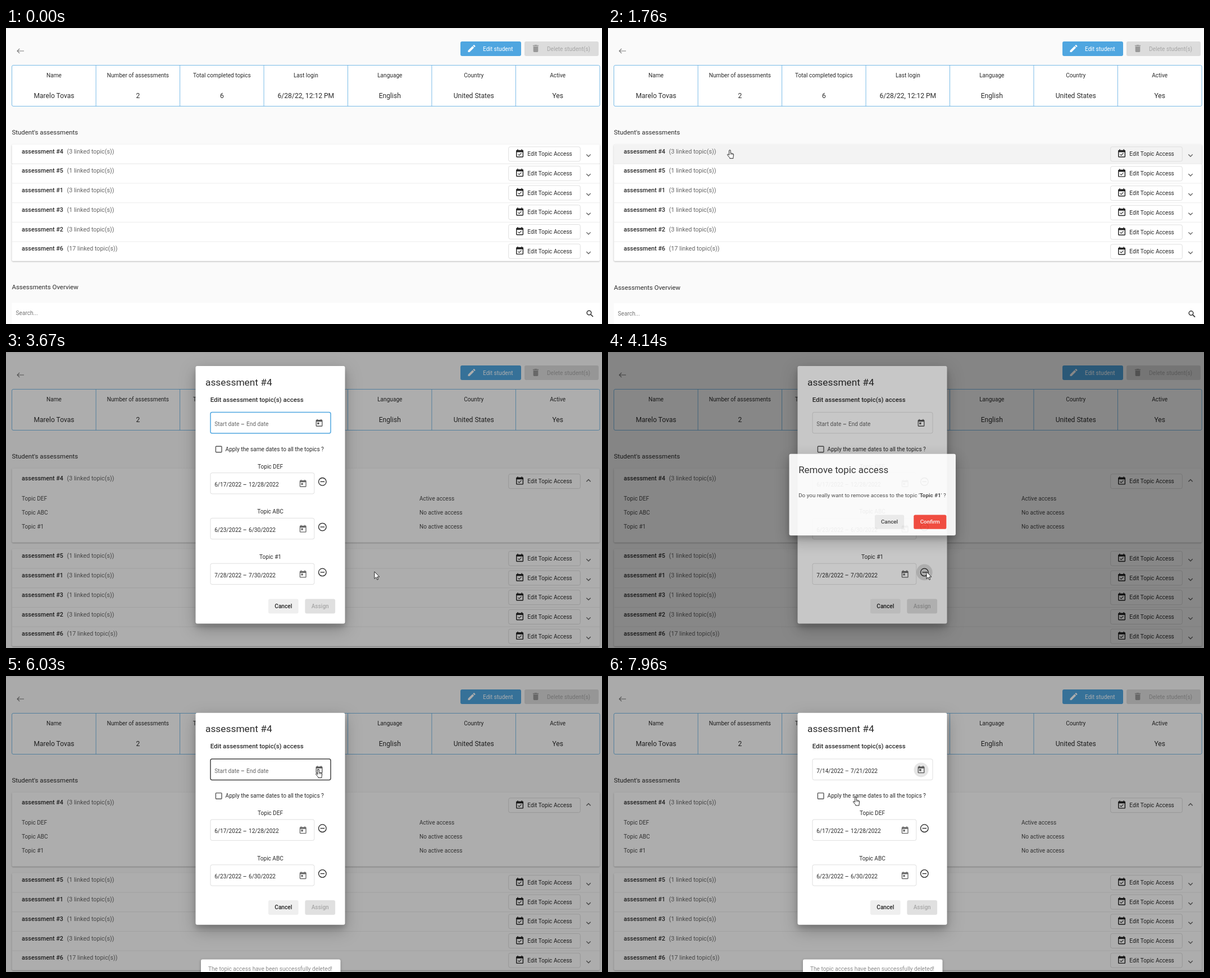
Write an HTML page that moves like this. It is 1061 px wide and 528 px high and loops after 8000 ms.

```html
<!DOCTYPE html>
<html lang="en">
<head>
<meta charset="utf-8">
<title>Student assessments</title>
<style>
html, body { margin: 0; width: 100%; height: 100%; overflow: hidden; background: #fafafa; }
svg { display: block; width: 100vw; height: 100vh; font: 10.1px Roboto, sans-serif; fill: #2b2b2b; }
.m { font-weight: 500; }
.b { font-weight: 700; }
.card { fill: #fff; filter: drop-shadow(0 1px 1px rgba(0,0,0,.28)); }
.modal { fill: #fff; filter: drop-shadow(0 6px 5px rgba(0,0,0,.16)) drop-shadow(0 9px 14px rgba(0,0,0,.26)); }
.pop { fill: #fff; filter: drop-shadow(0 1px 2px rgba(0,0,0,.3)); }
</style>
</head>
<body>
<svg id="stage" viewBox="0 0 1061 528" xmlns="http://www.w3.org/2000/svg"></svg>
<script>
const LOOP = 8000, BLUE = '#4fa6e0', STEP = 34.72, TOPIC = 80.8;
const stage = document.getElementById('stage');

// ---- markup helpers
const text = (x, y, s, o = '') => `<text x="${x}" y="${y}" ${o}>${s}</text>`;
const mid = (x, y, s, o = '') => text(x, y, s, 'text-anchor="middle" ' + o);
const rect = (x, y, w, h, o = '') => `<rect x="${x}" y="${y}" width="${w}" height="${h}" ${o}/>`;
const group = (id, s, o = '') => `<g id="${id}" ${o}>${s}</g>`;
const line = (d, o) => `<path d="${d}" fill="none" ${o}/>`;
const icon = (cx, cy, d, fill, k = .7225) =>
  `<path transform="translate(${cx} ${cy}) scale(${k}) translate(-12 -12)" d="${d}" fill="${fill}" fill-rule="evenodd"/>`;

const CAL = 'M19 3h-1V1h-2v2H8V1H6v2H5q-2 0-2 2v14q0 2 2 2h14q2 0 2-2V5q0-2-2-2zm0 16H5V8h14z';
const CAL_DAY = CAL + 'M7 10h5v5H7z';
const CAL_CHECK = CAL + 'M16.5 11l-1-1-4.9 4.9-2.1-2.1-1.1 1 3.2 3.2z';
const PENCIL = 'M3 17.2V21h3.8L17.8 9.9l-3.7-3.7zM20.7 7q.7-.7 0-1.4l-2.3-2.3q-.7-.7-1.4 0l-1.9 1.8 3.8 3.8z';
const TRASH = 'M6 19q0 2 2 2h8q2 0 2-2V7H6zM19 4h-3.5l-1-1h-5l-1 1H5v2h14z';

// ---- page
const columns = [
  ['Name', 'Marelo Tovas'], ['Number of assessments', '2'], ['Total completed topics', '6'],
  ['Last login', '6/28/22, 12:12 PM'], ['Language', 'English'], ['Country', 'United States'], ['Active', 'Yes']
];
const rows = [[4, 3], [5, 1], [1, 3], [3, 1], [2, 3], [6, 17]];

function header() {
  const border = `stroke="${BLUE}" stroke-width=".75"`;
  let s = rect(0, 0, 1061, 528, 'fill="#fafafa"') + rect(0, 0, 1061, 1.6, 'fill="#efefef"');
  s += line('M32 41H20M24.2 36.8L20 41l4.2 4.2', 'stroke="#7a7a7a" stroke-width="1.2"');
  s += rect(809, 24, 108, 26, `rx="3" fill="${BLUE}"`) + icon(829, 36.5, PENCIL, '#fff') +
    text(849, 40.6, 'Edit student', 'fill="#fff"');
  s += rect(923, 24, 132, 26, 'rx="3" fill="#dcdcdc"') + icon(943, 36.5, TRASH, '#999') +
    text(963, 40.6, 'Delete student(s)', 'fill="#a6a6a6"');
  s += rect(10.5, 66.5, 1046.5, 73, `rx="2.5" fill="#fff" ${border}`);
  columns.forEach(([name, value], i) => {
    const x = 10.7 + 149.45 * i;
    if (i) s += line(`M${x} 66.5v73`, border);
    s += mid(x + 74.8, 88, name) + mid(x + 74.8, 124.8, value, 'font-size="12.1"');
  });
  return s + text(10.5, 189.5, 'Student\'s assessments', 'font-size="11.45"');
}

const row = ([id, count], i) => group('row' + i,
  rect(10.5, 207.5, 1046.5, STEP, `id="hover${i}" fill="#f3f3f3"`) +
  (i > 1 ? line('M10.5 207.5h1046.5', 'stroke="#ececec"') : '') +
  group('head' + i,
    text(28, 223.7, 'assessment #' + id, 'class="m" font-size="10.75"') +
    text(108.6, 223.7, `(${count} linked topic(s))`, 'font-size="10.75" fill="#666"') +
    group('edit' + i,
      rect(894.7, 211.9, 127.6, 26, 'rx="3" fill="none" stroke="#dedede"') +
      (i ? '' : `<circle id="ripple" cx="935" cy="226" r="0" clip-path="url(#btn)"/>`) +
      icon(914.6, 224.3, CAL_CHECK, '#222') + text(928.3, 228.4, 'Edit Topic Access')) +
    line('M-3.7 0L0 3.7L3.7 0', `id="chev${i}" stroke="#666" stroke-width="1.4"`)));

const details = [['DEF', 'Active access'], ['ABC', 'No active access'], ['#1', 'No active access']]
  .map(([name, state], i) => text(28, 253.4 + 24.8 * i, 'Topic ' + name, 'fill="#484848"') +
    text(736, 253.4 + 24.8 * i, state, 'fill="#484848"')).join('');

const page = header() +
  `<clipPath id="btn">${rect(894.7, 211.9, 127.6, 26, 'rx="3"')}</clipPath>` +
  `<clipPath id="open">${rect(10, 207, 1048, 0, 'id="openBox"')}</clipPath>` +
  rect(10.5, 207.5, 1046.5, STEP, 'id="first" class="card" rx="2"') +
  rect(10.5, 207.5, 1046.5, STEP * 5, 'id="rest" class="card" rx="2"') +
  `<g clip-path="url(#open)">${group('details', details)}</g>` +
  rows.map(row).join('') + line('M10.5 242.2h1046.5', 'id="seam" stroke="#ececec"') +
  group('below',
    text(10.5, 466, 'Assessments Overview', 'font-size="11.45"') +
    rect(10.5, 490, 1046.5, 60, 'fill="#fff"') +
    text(17.6, 512.4, 'Search...', 'fill="#757575"') +
    `<circle cx="1038" cy="508" r="3.8" fill="none" stroke="#333" stroke-width="1.5"/>` +
    line('M1041 511l4 4', 'stroke="#333" stroke-width="1.7"'));

// ---- dialogs
const button = (x, y, w, label, bg, fg) => rect(x, y, w, 26, `rx="3" fill="${bg}"`) +
  mid(x + w / 2, y + 16.3, label, `class="m" fill="${fg}"`);
const dates = (y, from, to, x2) => text(371.2, y, from) +
  line(`M${x2 - 9.5} ${y - 3.6}h5.2`, 'stroke="#333"') + text(x2, y, to);

const topic = ([name, from, to, x2], i) => group('topic' + i,
  mid(470.5, 207.7, 'Topic ' + name) +
  rect(364, 215.6, 184.8, 37.4, 'rx="3" fill="none" stroke="#000" stroke-opacity=".13"') +
  dates(240, from, to, x2) + icon(528.7, 235, CAL_DAY, '#666', .66) +
  (i == 2 ? '<circle id="press" cx="563.3" cy="231.3" r="14.3"/>' : '') +
  '<circle cx="563.3" cy="231.3" r="6.8" fill="none" stroke="#222" stroke-width="1.3"/>' +
  line('M559.6 231.3h7.4', 'stroke="#222" stroke-width="1.3"'),
  `transform="translate(0 ${TOPIC * i})"`);

const editor = rect(337.5, 25, 266, 459.5, 'id="sheet" class="modal" rx="3"') +
  group('form',
    text(355, 60, 'assessment #4', 'font-size="17.34"') +
    text(363.7, 88.7, 'Edit assessment topic(s) access', 'class="m" font-size="11.45"') +
    rect(364, 107.6, 214, 37.4, 'id="field" rx="3" fill="none"') +
    text(371.2, 132.4, '', 'id="from"') + line('M0 128.8h5.2', 'id="dash" stroke="#555"') + text(0, 132.4, '', 'id="to"') +
    '<circle id="toggle" cx="557.5" cy="127" r="13" fill-opacity=".12"/>' + icon(557.5, 127, CAL_DAY, '#555', .66) +
    rect(373.4, 168.2, 10.6, 10.6, 'rx="1" fill="none" stroke="#555" stroke-width="1.4"') +
    text(390.6, 177.1, 'Apply the same dates to all the topics ?') +
    [['DEF', '6/17/2022', '12/28/2022', 432], ['ABC', '6/23/2022', '6/30/2022', 432],
      ['#1', '7/28/2022', '7/30/2022', 432]].map(topic).join('') +
    group('actions', button(467, 440.5, 53.6, 'Cancel', '#efefef', '#222') +
      button(532.3, 440.5, 53.8, 'Assign', '#e0e0e0', '#a8a8a8')));

const confirmBox = rect(319, 180, 303.5, 149, 'class="modal" rx="3"') +
  text(336, 215, 'Remove topic access', 'font-size="17.34"') +
  text(336, 259, `Do you really want to remove access to the topic '<tspan class="b">Topic #1</tspan>' ?`, 'fill="#444"') +
  button(475, 291.3, 53.5, 'Cancel', '#eee', '#333') + button(546, 291.3, 59.5, 'Confirm', '#f44336', '#fff');

// ---- date picker
const cellX = c => 369.8 + 28.9 * (c + .5), cellY = r => 277 + 28.9 * r;
const dot = (c, r, o) => `<circle cx="${cellX(c)}" cy="${cellY(r)}" r="13" ${o}/>`;

function month(id, name, offset, days, marks) {
  let s = marks + text(379, 220, name + ' 2022', 'class="m"') + text(378, 280.4, name, 'class="m" fill="#757575"');
  for (let d = 1; d <= days; d++) {
    const n = d + offset - 1;
    const on = id == 'july' && (d == 14 || d == 21);
    s += mid(cellX(n % 7), cellY(n / 7 | 0) + 3.4, d, on ? `id="day${d}"` : '');
  }
  return group(id, s);
}

const picker = rect(364, 186, 214, 255.8, 'class="pop" rx="3"') +
  '<path d="M429.5 214.5h7l-3.5 3.7z" fill="#757575"/>' +
  line('M533 212.3l-4 4 4 4M557.6 212.3l4 4-4 4', 'stroke="#666" stroke-width="1.4"') +
  [...'SMTWTFS'].map((d, i) => mid(cellX(i), 248, d, 'font-size="8" fill="#8a8a8a"')).join('') +
  line('M364 257h214', 'stroke="#e2e2e2"') +
  month('june', 'JUN', 3, 30, dot(2, 4, 'fill="none" stroke="#aaa"')) +
  month('july', 'JUL', 5, 31, dot(4, 2, `id="mark14" fill="${BLUE}"`) + dot(4, 3, `id="mark21" fill="${BLUE}"`));

const shade = id => rect(0, 0, 1061, 528, `id="${id}" fill="#000"`);
stage.innerHTML = page + shade('shade1') + group('editor', editor) + shade('shade2') +
  group('confirm', confirmBox) + group('picker', picker) +
  group('snack', rect(347, 505.5, 248.5, 35, 'class="pop" rx="3"') +
    text(360, 525.6, 'The topic access have been successfully deleted!', 'fill="#8c8c8c"')) +
  group('cursor',
    '<path id="arrow" d="M0 0V12.6l2.9-2.7 2 4.5 1.9-.8-2-4.4h4z"/>' +
    group('hand', '<path d="M-1.3 1.3a1.3 1.3 0 0 1 2.6 0V5.5l3.8.8q1.8.4 1.6 2.4L6 12.8V15H-.2v-1.2L-4.3 9q-.7-1.6 1.2-1.5l1.8 1.6z"/>' +
      line('M1.3 6v2.6M3.3 6.4v2.3M5.1 6.8v2.2', 'stroke-width=".6"')),
    'fill="#fff" stroke="#111" stroke-width=".9" stroke-linejoin="round"');

// ---- motion
const el = {};
stage.querySelectorAll('[id]').forEach(e => el[e.id] = e);
const set = (id, o) => { for (const k in o) el[id].setAttribute(k, o[k]); };
const show = (id, on) => set(id, { display: on ? 'inline' : 'none' });
const clamp = v => Math.min(1, Math.max(0, v));

function bezier(x1, y1, x2, y2) {
  const at = (a, b, u) => 3 * a * u * (1 - u) ** 2 + 3 * b * u * u * (1 - u) + u ** 3;
  return x => {
    let lo = 0, hi = 1;
    for (let i = 0; i < 24; i++) {
      const u = (lo + hi) / 2;
      if (at(x1, x2, u) < x) lo = u; else hi = u;
    }
    return x <= 0 ? 0 : x >= 1 ? 1 : at(y1, y2, lo);
  };
}
const easeOut = bezier(0, 0, .2, 1), easeStd = bezier(.4, 0, .2, 1), easeFade = bezier(.25, .8, .25, 1);
const run = (t, start, length, ease = x => x) => ease(clamp((t - start) / length));
const zoom = (cx, cy, kx, ky = kx) => `translate(${cx} ${cy}) scale(${kx} ${ky}) translate(${-cx} ${-cy})`;

// time, x, y, hand shape
const path = [
  [700, 330, 530, 0], [860, 280, 400, 1], [1030, 211, 208, 1], [1419, 211, 208, 1], [1420, 219, 213, 1],
  [1560, 219, 213, 1], [1740, 216.5, 217.5, 1], [1840, 220, 219, 1], [2100, 570, 231, 1], [2350, 930, 228, 1],
  [2410, 934, 227, 1], [2520, 934, 227, 0], [2750, 934, 227, 0], [3220, 874, 270, 0], [3620, 670, 385, 0],
  [3800, 598, 420, 0], [3940, 567, 392, 1], [4060, 567, 392, 0], [4260, 567, 392, 0], [4850, 612, 291, 0],
  [4980, 606, 294, 1], [5110, 598, 297, 1], [5480, 598, 297, 0], [5540, 598, 297, 0], [5920, 556, 167, 1],
  [6160, 556, 166, 0], [6260, 556, 166, 1], [6500, 560, 215, 1], [6600, 560, 215, 1], [6960, 500, 333, 1],
  [7080, 500, 333, 1], [7300, 500, 362, 1], [7450, 500, 362, 0], [7820, 440, 210, 1], [7960, 441, 216, 1],
  [LOOP, 441, 216, 1]
];

function pointer(t) {
  const i = path.findIndex(p => p[0] > t) - 1;
  if (i < 0) return null;
  const [t0, x0, y0, hand] = path[i], [t1, x1, y1] = path[i + 1];
  const u = (t - t0) / (t1 - t0), k = u * u * (3 - 2 * u);
  return { x: x0 + (x1 - x0) * k, y: y0 + (y1 - y0) * k, hand };
}

function drawPanels(t, mouse) {
  const p = run(t, 2530, 225, easeStd), jog = .6 * run(t, 180, 320) * (1 - p);
  const grow = 11.56 * p, height = STEP + 97.6 * p, shift = 109 * p;
  set('first', { height });
  set('openBox', { height });
  set('rest', { y: 242.2 + shift });
  set('seam', { opacity: 1 - clamp(p * 8) });
  set('details', { transform: `translate(0 ${grow})`, opacity: clamp(p * 4) });
  set('below', { transform: `translate(0 ${shift + jog})` });
  rows.forEach((_, i) => {
    const y = i * STEP + (i ? shift : 0), top = 207.5 + y;
    set('row' + i, { transform: `translate(0 ${y})` });
    set('head' + i, { transform: `translate(0 ${i ? 0 : grow / 2})` });
    set('edit' + i, { transform: `translate(0 ${i ? jog - .3 : 0})` });
    set('chev' + i, { transform: `translate(1037 225.5) rotate(${i ? 0 : 180 * p})` });
    show('hover' + i, mouse && t < 2520 && mouse.y >= top && mouse.y < top + STEP);
  });
  set('ripple', { r: 95 * run(t, 2480, 325, easeOut), 'fill-opacity': .12 * (1 - run(t, 2740, 350)) });
}

function drawEditor(t) {
  const p = run(t, 2523, 150, easeOut), removed = t >= 5660;
  show('editor', p > 0);
  set('editor', { opacity: p, transform: zoom(470.5, 254.7, .7 + .3 * p) });
  set('shade1', { opacity: .32 * run(t, 2523, 400, easeFade) });
  set('sheet', removed ? { y: 65.8, height: 377.9 } : { y: 25, height: 459.5 });
  set('form', { transform: `translate(0 ${removed ? TOPIC / 2 : 0})` });
  set('actions', { transform: `translate(0 ${removed ? -TOPIC : 0})` });
  show('topic2', !removed);
  set('press', { 'fill-opacity': .16 * run(t, 3980, 80) * (1 - run(t, 4250, 350)) });

  const focus = t > 2700 && t < 3980, over = t > 5880 && t < 6160;
  set('field', {
    stroke: focus ? BLUE : over ? '#444' : '#000',
    'stroke-opacity': focus || over ? 1 : .13, 'stroke-width': focus || over ? 1.5 : 1
  });
  const from = t > 7040, to = t > 7420, x = from ? 432 : 428;
  el.from.textContent = from ? '7/14/2022' : 'Start date';
  el.to.textContent = to ? '7/21/2022' : 'End date';
  set('from', { fill: from ? '#2b2b2b' : '#666' });
  set('to', { x, fill: to ? '#2b2b2b' : '#666' });
  set('dash', { transform: `translate(${x - 9.3} 0)` });
  show('toggle', t > 6160);
}

function drawOverlays(t) {
  const p = run(t, 4045, 150, easeOut), out = run(t, 5409, 75, easeStd);
  show('confirm', p > 0 && out < 1);
  set('confirm', { opacity: p * (1 - out), transform: zoom(470.7, 254.5, .7 + .3 * p) });
  set('shade2', { opacity: .32 * (run(t, 4045, 400, easeFade) - run(t, 5409, 400, easeFade)) });

  const cal = run(t, 6160, 120, easeOut), gone = run(t, 7450, 100);
  show('picker', cal > 0 && gone < 1);
  set('picker', { opacity: cal * (1 - gone), transform: zoom(471, 186, 1, .8 + .2 * cal) });
  show('june', t < 6560);
  show('july', t >= 6560);
  [[14, 7040], [21, 7420]].forEach(([d, at]) => {
    show('mark' + d, t > at);
    set('day' + d, { fill: t > at ? '#fff' : '#2b2b2b' });
  });

  const snack = run(t, 5720, 150, easeOut);
  show('snack', snack > 0);
  set('snack', { opacity: snack, transform: zoom(471, 523, .8 + .2 * snack) });
}

function render(t) {
  const mouse = pointer(t);
  drawPanels(t, mouse);
  drawEditor(t);
  drawOverlays(t);
  show('cursor', mouse);
  if (mouse) {
    set('cursor', { transform: `translate(${mouse.x} ${mouse.y})` });
    show('hand', mouse.hand);
    show('arrow', !mouse.hand);
  }
}

const begin = performance.now();
function tick() {
  render((performance.now() - begin) % LOOP);
  requestAnimationFrame(tick);
}
tick();
</script>
</body>
</html>
```
